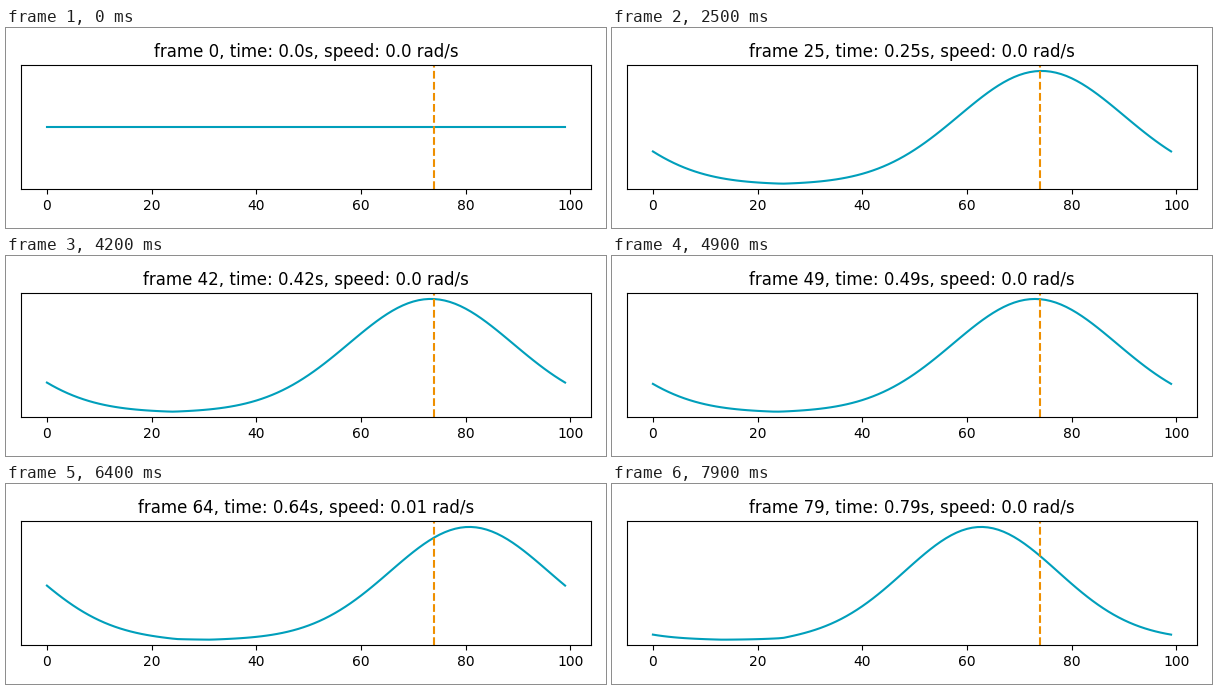
These frames come from a looping animation (600 px wide and 200 px high, 8000 ms). A matplotlib script:

```python
import matplotlib.pyplot as plt
import numpy as np
from matplotlib.animation import FuncAnimation

N = 100
FRAMES = 80
PERIOD = N - 1
HOME = 0.75 * PERIOD
SIGMA = PERIOD / (2 * np.pi)

# (step, bump centre, slope per step)
PATH = [(0, HOME, 0), (34, HOME, 0), (49, 73.0, 0.1),
        (58, 77.2, 0.5), (70, 80.9, -0.6), (79, 62.7, -2.3)]

x = np.arange(N)


def center(step):
    """Cubic Hermite path of the bump."""
    for (t0, p0, m0), (t1, p1, m1) in zip(PATH, PATH[1:]):
        if step <= t1:
            h = t1 - t0
            u = (step - t0) / h
            return ((2 * u**3 - 3 * u**2 + 1) * p0
                    + (u**3 - 2 * u**2 + u) * h * m0
                    + (3 * u**2 - 2 * u**3) * p1
                    + (u**3 - u**2) * h * m1)
    return PATH[-1][1]


def ring_dist(a, b):
    d = np.abs(a - b) % PERIOD
    return np.minimum(d, PERIOD - d)


def activity(step):
    """Ring activity scaled to 0..1; silent at the start."""
    if step == 0:
        return np.full(N, 0.5)
    c = center(step)
    shift = abs(c - HOME)
    width = SIGMA - 0.1 * shift
    u = np.exp(-ring_dist(x, c) ** 2 / (2 * width**2))
    # the fixed input leaves a cusp opposite its own position
    u -= 0.0017 * shift * np.exp(-ring_dist(x, HOME - PERIOD / 2) / 6)
    return (u - u.min()) / (u.max() - u.min())


def label(step):
    speed = 0.01 if 64 <= step <= 75 else 0.0
    return f"frame {step}, time: {round(step * 0.01, 2)}s, speed: {speed} rad/s"


fig, ax = plt.subplots(figsize=(6, 2), dpi=100)
line, = ax.plot(x, activity(0), color="#009FBB", lw=1.5)
ax.axvline(74, color="#EE8F00", ls="--", lw=1.5)
ax.set_ylim(-0.05, 1.05)
ax.set_yticks([])
title = ax.set_title(label(0))
fig.tight_layout()


def update(step):
    line.set_ydata(activity(step))
    title.set_text(label(step))
    return line, title


anim = FuncAnimation(fig, update, frames=FRAMES, interval=100,
                     repeat=True, repeat_delay=0, blit=False)
plt.show()
```
